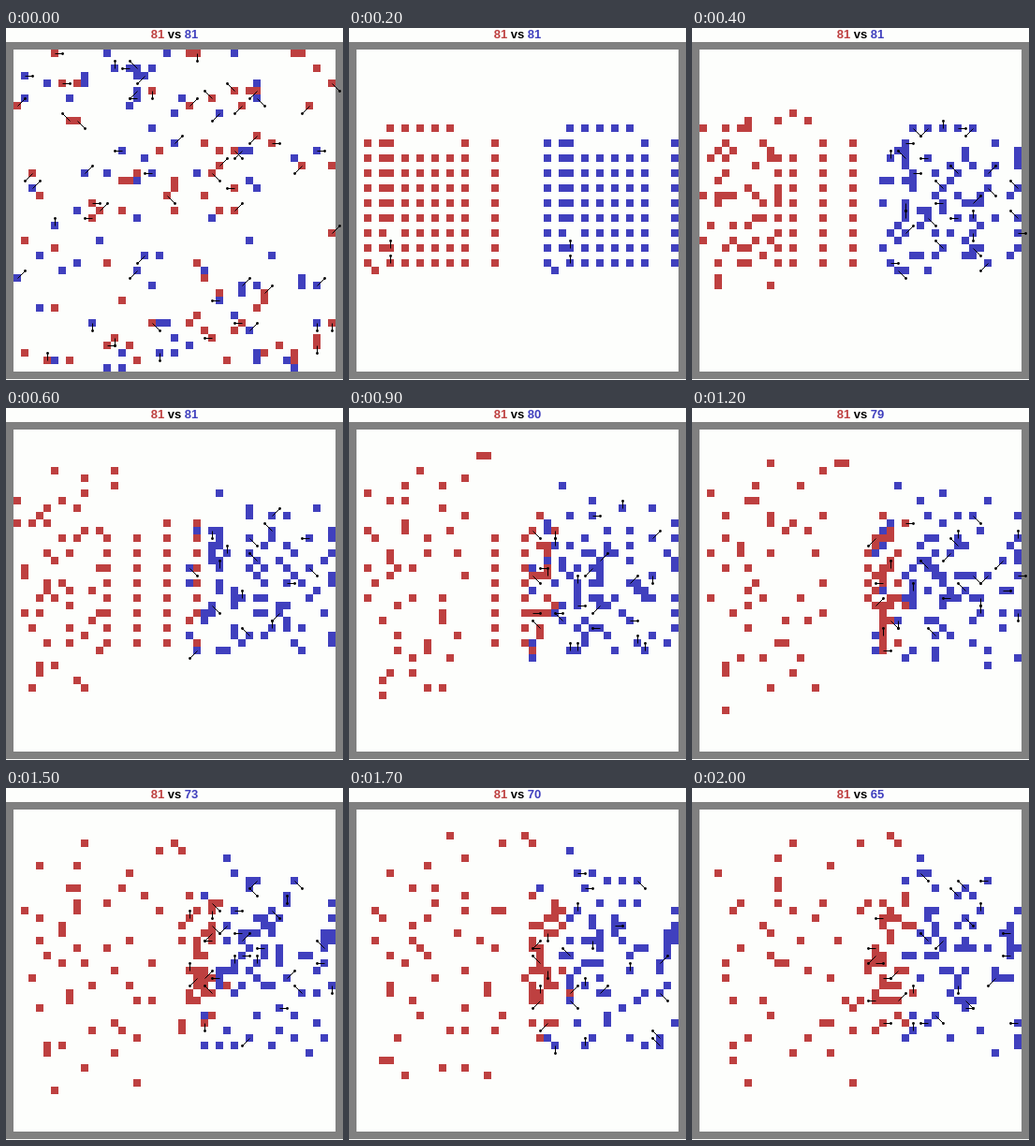
Write an HTML page with a canvas that moves like this. It is 360 px wide and 376 px high and loops after 2.1 s.

```html
<!DOCTYPE html>
<html lang="en">
<head>
<meta charset="utf-8">
<title>81 vs 81</title>
<style>
  html, body { margin: 0; width: 100%; height: 100%; overflow: hidden; background: #fdfefc; }
  canvas { display: block; }
</style>
</head>
<body>
<canvas id="stage" width="360" height="376"></canvas>
<script>
const ctx = document.getElementById('stage').getContext('2d');
const CELL = 8, SIZE = 43, LOOP = 2100, STEPS = 18;
const COLORS = { red: '#be4040', blue: '#4040be' };

let seed = 2026;
function rnd() {
  seed = seed + 0x6D2B79F5 | 0;
  let t = Math.imul(seed ^ seed >>> 15, 1 | seed);
  t = t + Math.imul(t ^ t >>> 7, 61 | t) ^ t;
  return ((t ^ t >>> 14) >>> 0) / 4294967296;
}
const int = n => Math.floor(rnd() * n);
const nudge = () => int(3) - 1;
function heading() {
  const a = int(8) * Math.PI / 4;
  return [Math.round(Math.cos(a)), Math.round(Math.sin(a))];
}
const clamp = (v, lo, hi) => Math.max(lo, Math.min(hi, v));

let units = [];
const isFree = (x, y, self) => x >= 0 && y >= 0 && x < SIZE && y < SIZE &&
  !units.some(u => u !== self && u.x === x && u.y === y);

function moveTo(u, x, y) {
  if (!isFree(x, y, u)) return false;
  u.x = x;
  u.y = y;
  return true;
}

// Both teams start dispersed over the whole field.
function disperse() {
  units = [];
  while (units.length < 162) {
    const x = int(SIZE), y = int(SIZE);
    if (isFree(x, y)) {
      units.push({ x, y, team: units.length < 81 ? 'red' : 'blue', aim: rnd() < 0.35 && heading() });
    }
  }
}

// Two blocks of nine by nine, every second cell.
function lineUp() {
  units = [];
  for (const team of ['red', 'blue']) {
    for (let col = 0; col < 9; col++) {
      for (let y = 12; y < 30; y += 2) {
        const left = team === 'red' ? 0 : 24;
        units.push({ x: left + 2 * col, y, col, team });
      }
    }
  }
}

function firstMove(u) {
  const { col, y } = u;
  if (col === 0) u.x += 1;
  else if (col === 1) {
    if (y === 28) u.y += 1;
    else u.x += 1;
  } else if (col === 2) {
    if (y < 25) u.y -= 2;
    else u.aim = [0, -1];
  } else if (col < 7) {
    if (y === 12) u.y -= 2;
  } else if (col === 8) u.x += 2;

  u.roams = u.team === 'red' && (col < 5 || u.y === 10);
  u.from = [u.x, u.y];
  u.goal = [2 + (col + rnd()) * 4, 20.5 + (u.y - 20) * 1.55 + rnd() * 4 - 2];
}

// Rear units fan out, upward and downward first, then to the right.
function roam(u, step) {
  const fx = (step - 1) / 17, fy = Math.min(1, (step - 1) / 4);
  const x = u.from[0] + (u.goal[0] - u.from[0]) * fx;
  const y = u.from[1] + (u.goal[1] - u.from[1]) * fy;
  for (let i = 0; i < 3; i++) {
    if (moveTo(u, Math.round(x) + nudge(), Math.round(y) + nudge())) return;
  }
}

function skirmish(u, lo, hi) {
  if (rnd() < 0.27) {
    u.aim = heading();
    return;
  }
  const [dx, dy] = heading();
  moveTo(u, clamp(u.x + dx, lo, hi), u.y + dy);
}

function advance(u, step) {
  u.aim = null;
  if (step === 1) firstMove(u);
  else if (u.team === 'blue') skirmish(u, 23, 42);
  else if (u.roams) roam(u, step);
  else if (u.x < 23) {
    if (step > 8 - u.col) moveTo(u, u.x + 2, u.y) || moveTo(u, u.x + 1, u.y + nudge());
  } else skirmish(u, 22, 30);
}

const LOSSES = [[0, 81], [6, 81], [7, 80], [10, 79], [13, 73], [18, 65]];
function survivors(step) {
  const i = LOSSES.findIndex(p => p[0] >= step);
  if (i < 1) return 81;
  const [s0, n0] = LOSSES[i - 1], [s1, n1] = LOSSES[i];
  return Math.round(n0 + (n1 - n0) * (step - s0) / (s1 - s0));
}

const team = name => units.filter(u => u.team === name);

// The blue unit with the most red neighbours falls.
function removeWeakest() {
  const reds = team('red');
  const threat = b => reds.reduce((sum, r) => sum + 1 / ((r.x - b.x) ** 2 + (r.y - b.y) ** 2), 0);
  const victim = team('blue').reduce((a, b) => threat(b) > threat(a) ? b : a);
  units.splice(units.indexOf(victim), 1);
}

const frames = [];
const save = () => frames.push(units.map(u => ({ ...u })));
disperse();
save();
lineUp();
save();
for (let step = 1; step <= STEPS; step++) {
  for (const u of units) advance(u, step);
  while (team('blue').length > survivors(step)) removeWeakest();
  save();
}

function drawTitle(list) {
  const blue = list.filter(u => u.team === 'blue').length;
  const parts = [[list.length - blue, COLORS.red], [' vs ', '#000'], [blue, COLORS.blue]];
  ctx.font = 'bold 13px "Liberation Sans", Arial, sans-serif';
  let x = 180 - ctx.measureText(parts.map(p => p[0]).join('')).width / 2;
  for (const [text, color] of parts) {
    ctx.fillStyle = color;
    ctx.fillText(text, x, 11);
    x += ctx.measureText(text).width;
  }
}

function draw(list) {
  ctx.fillStyle = '#fdfefc';
  ctx.fillRect(0, 0, 360, 376);
  ctx.fillStyle = '#808080';
  ctx.fillRect(0, 15, 360, 360);
  ctx.fillStyle = '#fdfefc';
  ctx.fillRect(8, 23, 344, 344);
  drawTitle(list);
  for (const u of list) {
    ctx.fillStyle = COLORS[u.team];
    ctx.fillRect(8 + u.x * CELL, 23 + u.y * CELL, CELL, CELL);
  }
  ctx.fillStyle = ctx.strokeStyle = '#000';
  ctx.lineWidth = 1;
  for (const u of list) {
    if (!u.aim) continue;
    const x = 12.5 + u.x * CELL, y = 27.5 + u.y * CELL;
    const ex = x + u.aim[0] * CELL, ey = y + u.aim[1] * CELL;
    ctx.beginPath();
    ctx.moveTo(x, y);
    ctx.lineTo(ex, ey);
    ctx.stroke();
    ctx.beginPath();
    ctx.arc(ex, ey, 1.4, 0, 2 * Math.PI);
    ctx.fill();
  }
}

function tick() {
  const slot = Math.floor(performance.now() % LOOP / 100);
  draw(frames[slot < 3 ? slot : slot - 1]); // the third picture is held for two slots
  requestAnimationFrame(tick);
}
tick();
</script>
</body>
</html>
```
